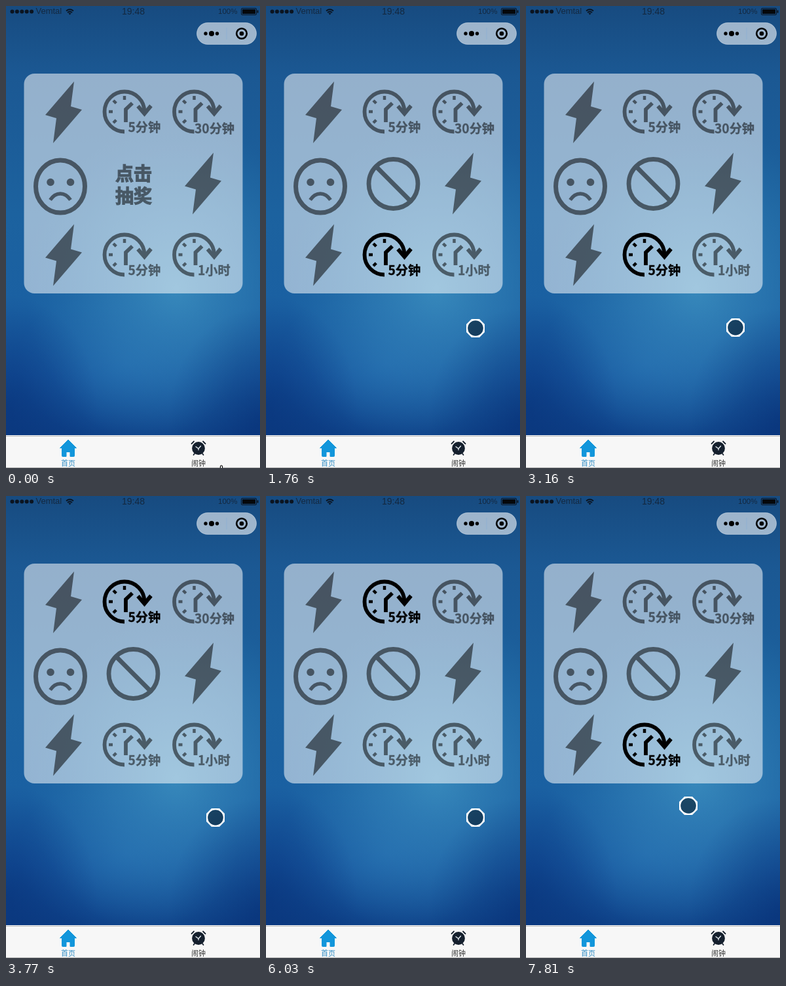
An HTML page for the animation above (8 s loop, 388 by 704 pixels).

```html
<!DOCTYPE html>
<html lang="zh-CN">
<head>
<meta charset="utf-8">
<title>抽奖</title>
<style>
html, body { margin: 0; width: 100%; height: 100%; overflow: hidden; background: #1a5a9c; }
svg { display: block; width: 388px; height: 704px; }
text { font-family: "Noto Sans CJK SC", "Noto Sans CJK", "Noto Sans", sans-serif; }
.bar { font-family: "Liberation Sans", Arial, sans-serif; fill: #14283f; }
.cell { opacity: .52; }
.cell.on { opacity: 1; }
.line { fill: none; stroke: #000; }
.label { font-size: 19.2px; font-weight: 700; stroke: #000; stroke-width: .3px; }
.big { font-size: 28px; font-weight: 900; text-anchor: middle; stroke: #000; stroke-width: 1.2px; }
.tab { font-size: 11px; font-weight: 300; text-anchor: middle; }
</style>
</head>
<body>
<svg id="stage" viewBox="0 0 388 704">
  <defs>
    <linearGradient id="sky" x1="0" y1="0" x2="0" y2="1">
      <stop offset="0" stop-color="#174b80"/>
      <stop offset=".15" stop-color="#1b5893"/>
      <stop offset=".45" stop-color="#1c629f"/>
      <stop offset=".65" stop-color="#1a60a2"/>
      <stop offset=".8" stop-color="#13509a"/>
      <stop offset=".93" stop-color="#0d3f86"/>
    </linearGradient>
    <radialGradient id="glow" gradientUnits="userSpaceOnUse" cx="0" cy="0" r="1"
      gradientTransform="translate(260 430) scale(230 250)">
      <stop offset="0" stop-color="#3f93c2" stop-opacity=".8"/>
      <stop offset=".45" stop-color="#3585b9" stop-opacity=".52"/>
      <stop offset="1" stop-color="#2a78b0" stop-opacity="0"/>
    </radialGradient>
    <radialGradient id="low" gradientUnits="userSpaceOnUse" cx="0" cy="0" r="1"
      gradientTransform="translate(185 545) scale(170 120)">
      <stop offset="0" stop-color="#2f7fbc" stop-opacity=".42"/>
      <stop offset="1" stop-color="#2f7fbc" stop-opacity="0"/>
    </radialGradient>
    <radialGradient id="dusk">
      <stop offset="0" stop-color="#062c72" stop-opacity=".5"/>
      <stop offset="1" stop-color="#062c72" stop-opacity="0"/>
    </radialGradient>
  </defs>

  <rect width="388" height="704" fill="url(#sky)"/>
  <rect width="388" height="704" fill="url(#glow)"/>
  <rect width="388" height="704" fill="url(#low)"/>
  <ellipse cx="0" cy="610" rx="140" ry="170" fill="url(#dusk)"/>
  <ellipse cx="388" cy="630" rx="140" ry="170" fill="url(#dusk)"/>

  <!-- status bar -->
  <g id="dots" fill="#0b1420"></g>
  <text class="bar" x="45.500" y="12" font-size="13">Vemtal</text>
  <g fill="none" stroke="#0b1420" stroke-width="1.800">
    <path d="M92 7.500Q97.500 3 103 7.500M94 10Q97.500 7 101 10"/>
    <path d="M97.500 13.500l-2-2.300q2-1.400 4 0z" fill="#0b1420" stroke="none"/>
  </g>
  <text class="bar" x="194.500" y="13" font-size="14" text-anchor="middle">19:48</text>
  <text class="bar" x="324" y="11.500" font-size="11.500">100%</text>
  <rect x="359.500" y="3.500" width="23" height="10" rx="1.500" fill="none" stroke="#0b1420"/>
  <rect x="361" y="5" width="20" height="7" fill="#05080c"/>
  <rect x="383.500" y="6.500" width="2" height="4" fill="#0b1420"/>

  <!-- capsule -->
  <rect x="291.500" y="25.500" width="91" height="33" rx="16.500" fill="#fff" fill-opacity=".58" stroke="#fff" stroke-opacity=".4"/>
  <circle cx="305" cy="42" r="2.700"/><circle cx="314" cy="42" r="4"/><circle cx="322.500" cy="42" r="2.700"/>
  <path d="M337 33v18" stroke="#8fb0d2"/>
  <circle cx="360" cy="42" r="7.800" fill="none" stroke="#000" stroke-width="2.600"/>
  <circle cx="360" cy="42" r="3.300"/>

  <rect x="27.500" y="103" width="334" height="335" rx="16" fill="#fff" fill-opacity=".53"/>
  <g id="board"></g>

  <!-- tab bar -->
  <rect y="654" width="388" height="50" fill="#f7f7f7"/>
  <path d="M0 654.500h388" stroke="#fff"/>
  <path d="M0 655.500h388M0 703.500h388" stroke="#b4b4b4"/>
  <path d="M95 661L107.500 673.500H104.500V685.500Q104.500 686.500 103.500 686.500H98V679.500H92V686.500H86.500Q85.500 686.500 85.500 685.500V673.500H82.500Z"
    fill="#1296db" stroke="#1296db" stroke-linejoin="round"/>
  <text class="tab" x="95" y="701" fill="#2f8cc4">首页</text>
  <g fill="none" stroke="#15202e" stroke-width="1.800" stroke-linecap="round">
    <circle cx="294" cy="674" r="9" fill="#15202e"/>
    <path d="M283.500 667l3.500-3.500M304.500 667l-3.500-3.500M288 682l-1.500 2M300 682l1.500 2"/>
    <path d="M290 671.500l4 3 3.500-4M294 674.500v2" stroke="#e4eaf0" stroke-width="1.300"/>
  </g>
  <text class="tab" x="294" y="701" fill="#333">闹钟</text>

  <g id="finger">
    <path d="M327.500 705v-3q0-2 1.500-2t1.500 2v3" fill="#fff" stroke="#000" stroke-width="1.200"/>
  </g>
  <g id="touch">
    <circle r="12" fill="#000" fill-opacity=".45"/>
    <path d="M-6-14H6L14-6V6L6 14H-6L-14 6V-6ZM-11.800 0a11.800 11.800 0 1 0 23.600 0a11.800 11.800 0 1 0-23.600 0Z"
      fill="#fff" fill-rule="evenodd"/>
  </g>
</svg>
<script>
const LOOP = 8000, START = 760;
const $ = id => document.getElementById(id);

const cell = (x, y, body) => `<g class="cell" transform="translate(${x} ${y})">${body}</g>`;
const bolt = (x, y) => cell(x, y, '<path d="M44 0L0 51L17 56L12 94L56 43L39 38Z"/>');

// Clock face centred on the cell's own zero point
const ticks = [225, 270, 315, 360].map(a =>
  `<path d="M0-24V-18" transform="rotate(${a})"/>`).join('');
const clock = (x, y, label, lx, ly) => cell(x, y, `
  <g class="line">
    <path d="M0 30.500A30.500 30.500 0 1 1 30.500 0" stroke-width="5.800"/>
    <path d="M20.500-8.500L30.500 3L40.500-9" stroke-width="6"/>
    <path d="M12-13L2-3.500V16" stroke-width="5.800"/>
    <g stroke-width="4.500">${ticks}</g>
  </g>
  <text class="label" x="${lx}" y="${ly}">${label}</text>`);

const face = (x, y) => cell(x, y, `
  <g class="line" stroke-width="7">
    <ellipse rx="37.500" ry="40"/>
    <path d="M-15.500 20.500Q-9 11 0 11T15.500 20.500" stroke-width="5.500"/>
  </g>
  <circle cx="-15" cy="-6.500" r="5.800"/><circle cx="15.500" cy="-6.500" r="5.800"/>`);

// Cells in the order the light runs round
const cells = [
  bolt(60, 115),
  clock(181, 161, '5分钟', 5.5, 31),
  clock(287.5, 161, '30分钟', 0.5, 33),
  bolt(273, 223.5),
  clock(287.5, 379, '1小时', 5.5, 31),
  clock(181, 379, '5分钟', 5.5, 31),
  bolt(60, 332.5),
  face(83, 275)
];
$('board').innerHTML = cells.join('') +
  cell(195, 0, '<g id="go"><text class="big" y="266">点击</text><text class="big" y="299.500">抽奖</text></g>') +
  cell(194.5, 271, '<g id="ban" class="line" stroke-width="6.800"><circle r="37.500"/><path d="M-26.500-26.500L26.500 26.500"/></g>');
const lights = [...$('board').children].slice(0, cells.length);

$('dots').innerHTML = [0, 1, 2, 3, 4].map(i => `<circle cx="${9.500 + i * 7.400}" cy="8.500" r="3"/>`).join('');

// The screen refreshes only at these moments
const span = (a, b, n) => Array.from({ length: n }, (_, i) =>
  Math.ceil((a + (b - a) * i / (n - 1)) / 10) * 10);
const slow = [2690, 2760, 2840, 2920, 2990, 3160, 3310, 3390, 3620, 3770, 4000,
  4230, 4480, 4690, 5010, 5330, 5730, 6030, 6500, 6890, 7350, 7810];
const stamps = [0, ...span(70, 610, 8), ...span(START, 2990, 30), ...slow, ...span(6810, 7120, 5)]
  .sort((a, b) => a - b);
const snap = t => stamps.filter(s => s <= t).pop();

// Fast laps: time and number of moves; the slow moves follow one by one
const laps = [[760, 0], [920, 2], [1760, 21], [2610, 38], [2690, 40]];
const path = [
  [70, 316, 668], [300, 262, 420], [530, 193, 246], [610, 189, 239],
  [760, 215, 268], [840, 292, 352], [920, 339, 430], [1000, 340, 468],
  [1150, 338, 503], [1530, 336, 503], [1690, 322, 493], [1760, 320, 491],
  [1840, 320, 490], [6730, 320, 490], [7120, 248, 472]
];

function along(keys, t) {
  const i = keys.findLastIndex(k => k[0] <= t);
  if (i < 0) return keys[0].slice(1);
  const a = keys[i], b = keys[i + 1] || a;
  const p = b === a ? 0 : (t - a[0]) / (b[0] - a[0]);
  return a.slice(1).map((v, j) => v + (b[j + 1] - v) * p);
}

function litCell(t) {
  if (t < START) return -1;
  const late = slow.filter(s => s <= t).length;
  const moves = late ? 39 + late : Math.floor(along(laps, t)[0]);
  return moves % cells.length;
}

const show = (id, on) => $(id).setAttribute('visibility', on ? 'visible' : 'hidden');

function draw(time) {
  const t = snap(time % LOOP);
  const lit = litCell(t);
  lights.forEach((el, i) => el.classList.toggle('on', i === lit));
  show('go', t < START);
  show('ban', t >= START);
  show('finger', t < 70);
  show('touch', t >= 70);
  const [x, y] = along(path, t).map(Math.round);
  $('touch').setAttribute('transform', `translate(${x} ${y})`);
}

const begin = performance.now();
function loop() {
  draw(performance.now() - begin);
  requestAnimationFrame(loop);
}
loop();
</script>
</body>
</html>
```
